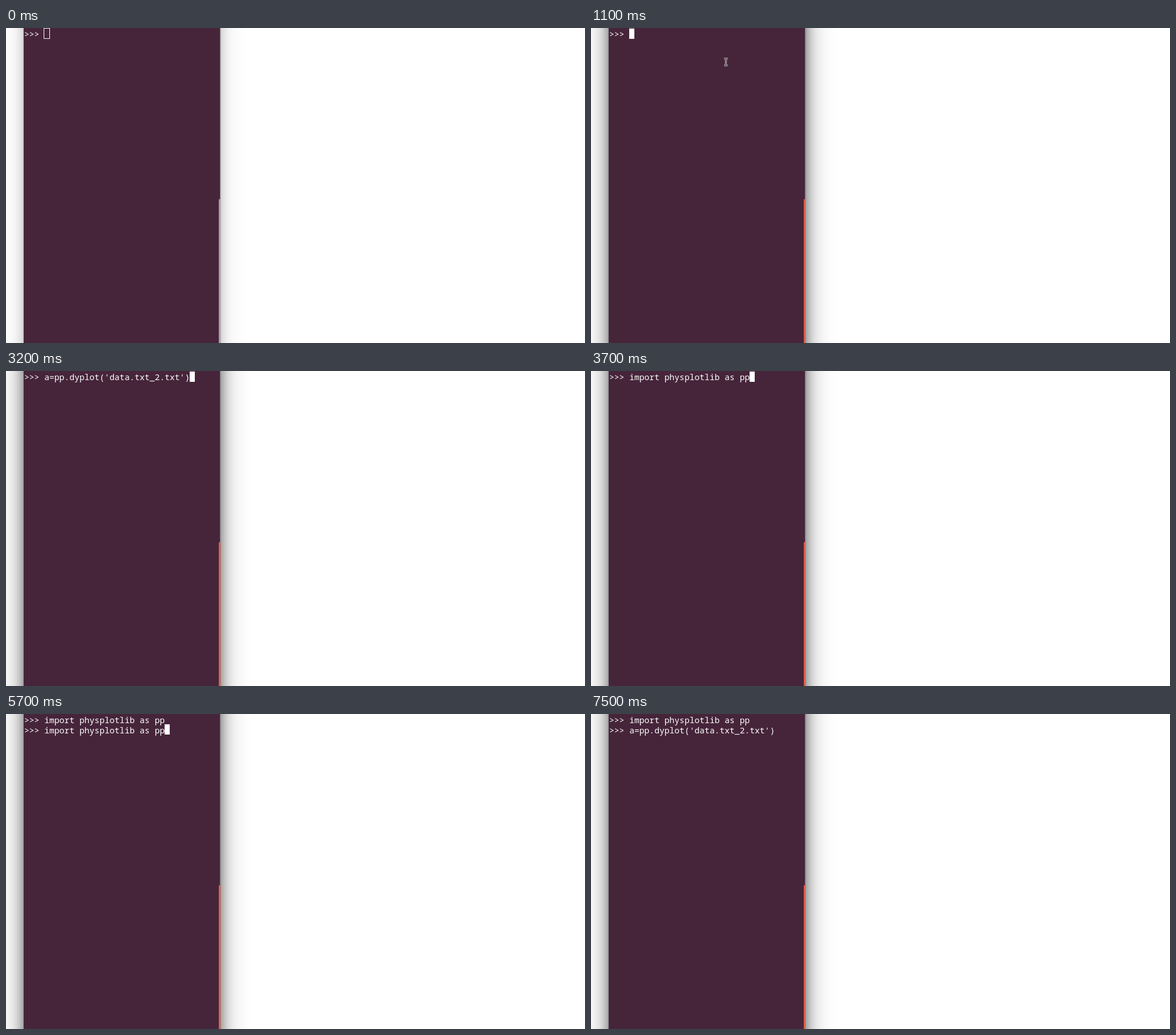
Write an HTML page that moves like this. It is 1015 px wide and 552 px high and loops after 8 s.

```html
<!DOCTYPE html>
<html lang="en">
<head>
<meta charset="utf-8">
<title>Terminal session</title>
<style>
  html, body { margin: 0; width: 100%; height: 100%; overflow: hidden; background: #fff; }
  #stage { position: absolute; inset: 0; overflow: hidden; }
  #win { position: absolute; left: 31px; top: -60px; width: 345px; height: 700px; background: #46253b; }
  svg { position: absolute; left: 0; top: 0; }
  text { font: 500 14.667px "Ubuntu Mono", "Noto Sans Mono", "DejaVu Sans Mono", monospace; fill: #fff; white-space: pre; }
</style>
</head>
<body>
<div id="stage">
  <div id="win"></div>
  <svg width="1015" height="552">
    <rect x="375" width="1" height="300" fill="#8c8489"/>
    <rect id="bar" x="373" y="300" width="3" height="252"/>
    <text id="line0" x="32" y="16"></text>
    <text id="line1" x="32" y="33.5"></text>
    <rect id="hollow" x="66.5" y=".5" width="10" height="18" fill="none" stroke="#fff"/>
    <rect id="caret" width="9" height="18" fill="#fff"/>
    <g id="mouse" fill="none">
      <path id="beam" d="M233.5 53.5h6M236.5 53.5v12M233.5 65.5h6" stroke-width="2.6" stroke="#fff"/>
      <path d="M233.5 53.5h6M236.5 53.5v12M233.5 65.5h6" stroke="#111"/>
    </g>
  </svg>
</div>
<script>
const LOOP = 8000, CHAR = 8.8, FOCUS = 1100;
const $ = id => document.getElementById(id);

const load = "import physplotlib as pp";
const clear = 'os.system("clear")';
const vertical = "a.verticalPlot(0,[5])";
const open = "a=pp.dyplot('data.txt_2.txt')";

// start time, row, typed text, caret visible
const steps = [
  [0, 0, "", true],
  [1800, 0, "", false],
  [2400, 0, clear, true],
  [2800, 0, vertical, true],
  [3200, 0, open, true],
  [3600, 0, load, true],
  [4300, 0, load, false],
  [4900, 1, "", true],
  [5600, 1, "", false],
  [5700, 1, load, true],
  [6100, 1, clear, true],
  [6400, 1, vertical, true],
  [6900, 1, open, true],
  [7500, 1, open, false]
];

const show = (id, on) => $(id).setAttribute("visibility", on ? "visible" : "hidden");
const shadow = (wide, tight) =>
  `0 0 44px rgba(0,0,0,${wide}), 0 0 18px rgba(0,0,0,${tight}), 0 0 2px rgba(0,0,0,.3)`;

function draw(now) {
  const t = now % LOOP;
  const [, row, typed, caretOn] = steps.findLast(s => s[0] <= t);
  const focused = t >= FOCUS;

  $("line0").textContent = ">>> " + (row ? load : typed);
  $("line1").textContent = row ? ">>> " + typed : "";
  $("caret").setAttribute("x", Math.floor(67.1 + CHAR * typed.length));
  $("caret").setAttribute("y", row ? 18 : 1);
  show("caret", focused && caretOn);
  show("hollow", !focused);

  $("win").style.boxShadow = focused ? shadow(.45, .35) : shadow(.15, .2);
  $("bar").setAttribute("fill", focused ? "#de604c" : "#b09ea8");

  // the pointer glides in, clicks to focus, and hides at the first key press
  const rest = Math.max(0, 1 - (t - 500) / (FOCUS - 500));
  $("mouse").setAttribute("transform", `translate(0 ${-52 * rest ** 2})`);
  show("mouse", t >= 500 && t < 2400);
}

const start = performance.now();
function tick() {
  draw(performance.now() - start);
  requestAnimationFrame(tick);
}
tick();
</script>
</body>
</html>
```
